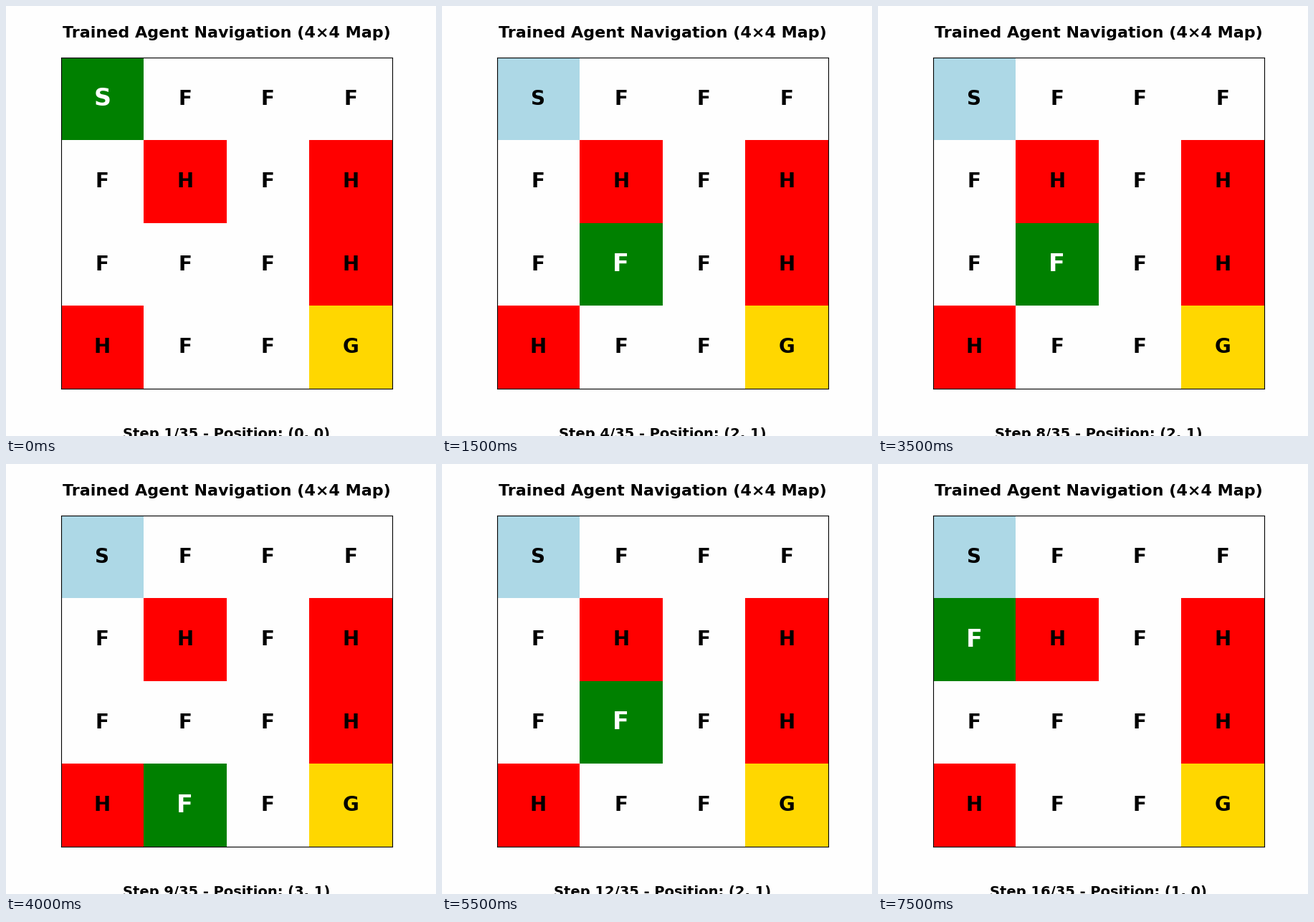
These frames come from a looping animation (600x600 px, 8000 ms). A matplotlib script:

```python
import numpy as np
import matplotlib.pyplot as plt
from matplotlib.animation import FuncAnimation
from matplotlib.colors import to_rgb

WHITE = "#fefefe"
plt.rcParams.update({"font.family": "DejaVu Sans", "font.weight": "bold",
                     "axes.titleweight": "bold", "figure.facecolor": WHITE})

LAKE = ["SFFF", "FHFH", "FFFH", "HFFG"]
COLORS = {"S": "lightblue", "F": WHITE, "H": "red", "G": "gold"}
MOVES = {"U": (-1, 0), "D": (1, 0), "L": (0, -1), "R": (0, 1), ".": (0, 0)}
WALK = "DDRLUDRDUDUL.U."  # "." means the agent slipped and stayed put
TOTAL = 35
STEP_MS = 500

base = np.array([[to_rgb(COLORS[tile]) for tile in row] for row in LAKE])

fig, ax = plt.subplots(figsize=(6, 6), dpi=100)
ax.set(xticks=[], yticks=[])
ax.set_title("Trained Agent Navigation (4×4 Map)", fontsize=16, pad=20)
board = ax.imshow(base)
letters = {
    (r, c): ax.text(c, r, tile, ha="center", va="center")
    for r, row in enumerate(LAKE) for c, tile in enumerate(row)
}
status = ax.text(0.5, -0.15, "", transform=ax.transAxes, ha="center",
                 fontsize=14)


def position(step):
    row = sum(MOVES[m][0] for m in WALK[:step])
    col = sum(MOVES[m][1] for m in WALK[:step])
    return row, col


def update(step):
    pos = position(step)
    cells = base.copy()
    cells[pos] = to_rgb("green")
    board.set_data(cells)
    for cell, letter in letters.items():
        here = cell == pos
        letter.set(color=WHITE if here else "black",
                   fontsize=24 if here else 20)
    status.set_text(f"Step {step + 1}/{TOTAL} - Position: {pos}")
    return [board, status, *letters.values()]


anim = FuncAnimation(fig, update, frames=len(WALK) + 1, interval=STEP_MS,
                     repeat=True, repeat_delay=0)
plt.show()
```
